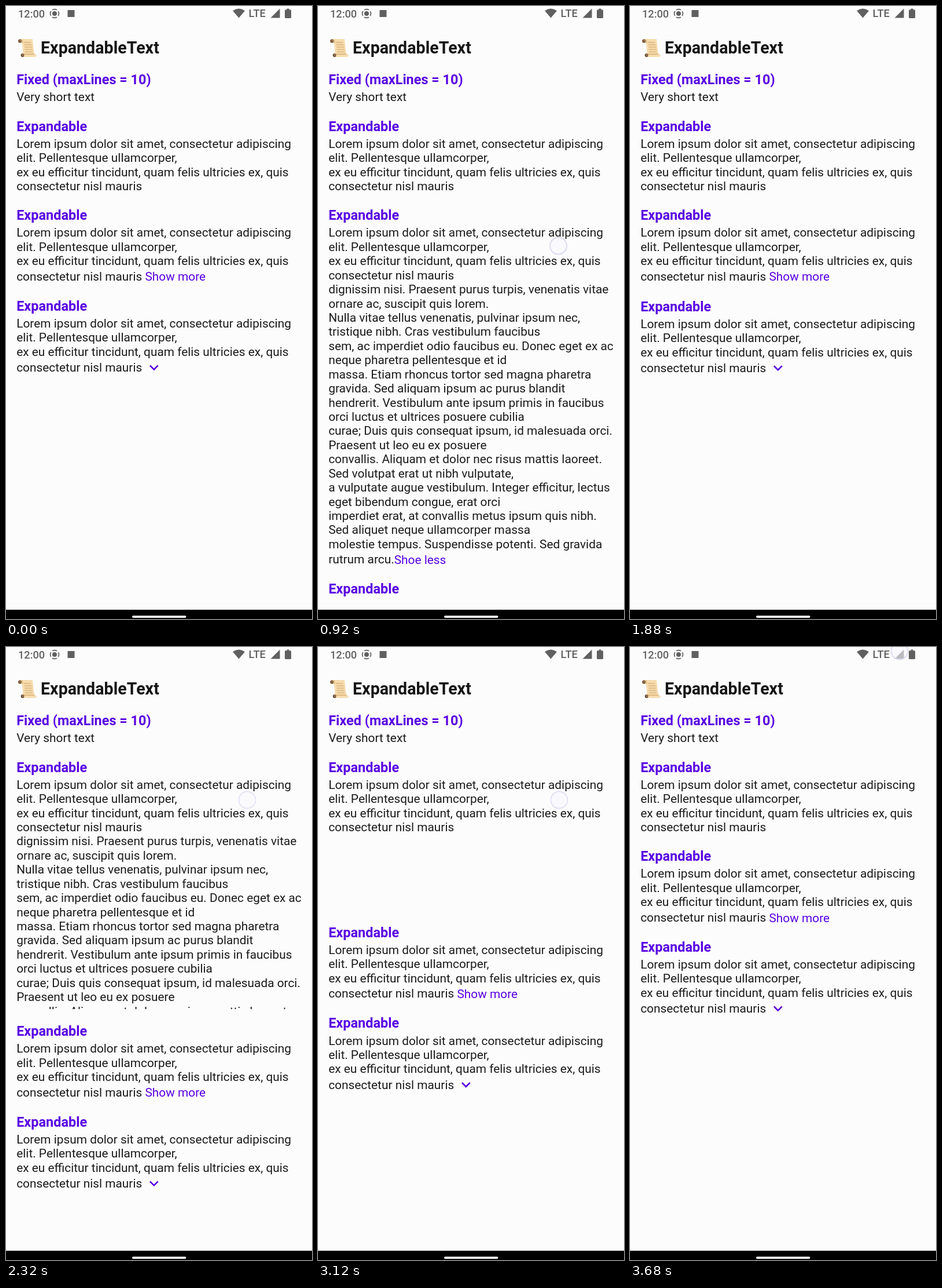
Animation, 529 px wide and 1058 px high, one loop 3.72 s. Source, as an HTML page:

```html
<!DOCTYPE html>
<html lang="en">
<head>
<meta charset="utf-8">
<title>ExpandableText</title>
<style>
  html, body { margin: 0; width: 100%; height: 100%; overflow: hidden; background: #fcfcfc; }
  svg { display: block; width: 529px; height: 1058px; }
  text { font: 20.85px Roboto, sans-serif; fill: #1b1b1b; white-space: pre; }
  .head { font-size: 23.45px; font-weight: 700; }
  .head, .link { fill: #5800e2; }
  .title { font-size: 28.6px; font-weight: 700; fill: #151515; }
  .status { fill: #606060; }
  .status text { font-size: 18.2px; font-weight: 500; fill: #606060; }
</style>
</head>
<body>
<svg viewBox="0 0 529 1058">
  <defs>
    <clipPath id="page"><rect width="529" height="1022"/></clipPath>
    <clipPath id="clip2"><rect id="room2" width="529"/></clipPath>
    <clipPath id="clip3"><rect id="room3" width="529"/></clipPath>
  </defs>
  <rect width="529" height="1058" fill="#fcfcfc"/>

  <g class="status">
    <text x="21" y="19.7">12:00</text>
    <circle cx="84" cy="13" r="4"/>
    <circle cx="84" cy="13" r="7.4" fill="none" stroke="#606060" stroke-width="1.7"
      stroke-dasharray="8.4 3.22" stroke-dashoffset="4.2"/>
    <rect x="106.5" y="7" width="12" height="12"/>
    <path d="M402.5 20.5L392 8.2Q402.5 .8 413 8.2Z"/>
    <text x="419.5" y="19.3">LTE</text>
    <path d="M457.5 20.5L473.5 4.5V20.5Z"/>
    <path d="M485.5 4.5h4v1.8h2q1.5 0 1.5 1.5v11.7q0 1.5 -1.5 1.5h-8q-1.5 0 -1.5-1.5V7.8q0-1.5 1.5-1.5h2Z"/>
  </g>

  <!-- scroll -->
  <path d="M25 57H46Q47 70 49 83Q53 83 53 86Q52 88 49 88H30Q29 75 28 64Q22 65 21 61Q21 57 25 57Z" fill="#f6dcae"/>
  <path d="M31 63h12M31.500 67h13M32 71h13M32.500 75h13M33 79h13" stroke="#d9b57c" stroke-width="1.3"/>
  <path d="M26 57.500Q30 59 28 64M30 83H49" fill="none" stroke="#d8ad70" stroke-width="1.3"/>
  <circle cx="24" cy="60.500" r="2.900" fill="#6b4a35"/>
  <circle cx="24.500" cy="60" r="1.100" fill="#d8ad70"/>
  <circle cx="28.500" cy="85" r="2.900" fill="#6b4a35"/>
  <circle cx="29" cy="84.500" r="1.100" fill="#d8ad70"/>
  <text class="title" x="60" y="82">ExpandableText</text>

  <g clip-path="url(#page)">
    <g id="sec1"></g>
    <g id="sec2"><g id="short2"></g><g id="long2" clip-path="url(#clip2)"></g></g>
    <g id="sec3"><g id="short3"></g><g id="long3" clip-path="url(#clip3)"></g></g>
    <g id="sec4">
      <path fill="#5800e2" transform="translate(240.200 608.300) scale(1.303)"
        d="M7.410 8.590L12 13.170l4.590-4.580L18 10l-6 6-6-6Z"/>
    </g>
  </g>

  <circle id="cursor" r="14.500" fill="#f6f6ff" fill-opacity=".6" stroke="#d9d9f1" stroke-width="1.800"/>
  <rect y="1042" width="529" height="16"/>
  <rect x="218" y="1052.300" width="93.500" height="3.600" rx="1.800" fill="#fff"/>
</svg>
<script>
const LOOP = 3720, STEP = 40, LEFT = 18.2, LINE = 24.43, GROW = 20 * LINE, RATE = 0.0185;
const $ = id => document.getElementById(id);

const lorem = `Lorem ipsum dolor sit amet, consectetur adipiscing
elit. Pellentesque ullamcorper,
ex eu efficitur tincidunt, quam felis ultricies ex, quis
consectetur nisl mauris
dignissim nisi. Praesent purus turpis, venenatis vitae
ornare ac, suscipit quis lorem.
Nulla vitae tellus venenatis, pulvinar ipsum nec,
tristique nibh. Cras vestibulum faucibus
sem, ac imperdiet odio faucibus eu. Donec eget ex ac
neque pharetra pellentesque et id
massa. Etiam rhoncus tortor sed magna pharetra
gravida. Sed aliquam ipsum ac purus blandit
hendrerit. Vestibulum ante ipsum primis in faucibus
orci luctus et ultrices posuere cubilia
curae; Duis quis consequat ipsum, id malesuada orci.
Praesent ut leo eu ex posuere
convallis. Aliquam et dolor nec risus mattis laoreet.
Sed volutpat erat ut nibh vulputate,
a vulputate augue vestibulum. Integer efficitur, lectus
eget bibendum congue, erat orci
imperdiet erat, at convallis metus ipsum quis nibh.
Sed aliquet neque ullamcorper massa
molestie tempus. Suspendisse potenti. Sed gravida
rutrum arcu.`.split("\n");

function addText(parent, y, str, cls = "") {
  const el = document.createElementNS("http://www.w3.org/2000/svg", "text");
  el.setAttribute("x", LEFT);
  el.setAttribute("y", y);
  el.setAttribute("class", cls);
  el.textContent = str;
  $(parent).append(el);
  return el;
}

// The last line sits lower by `drop` when it holds a link or an icon.
function addBody(parent, y, count, drop = 0, link = "") {
  lorem.slice(0, count).forEach((str, i) => {
    const last = i === count - 1;
    const el = addText(parent, y + i * LINE + (last ? drop : 0), str);
    if (last && link) {
      const span = document.createElementNS("http://www.w3.org/2000/svg", "tspan");
      span.setAttribute("class", "link");
      span.setAttribute("dy", 0.8);
      span.textContent = link;
      el.append(span);
    }
  });
}

addText("sec1", 135.3, "Fixed (maxLines = 10)", "head");
addText("sec1", 164.3, "Very short text");
addText("sec2", 215.5, "Expandable", "head");
addBody("short2", 244.7, 4);
addBody("long2", 244.7, 24);
addText("sec3", 369.2, "Expandable", "head");
addBody("short3", 398.4, 4, 2, " Show more");
addBody("long3", 398.4, 24, 2, "Shoe less");
addText("sec4", 525.8, "Expandable", "head");
addBody("sec4", 555, 4, 3.1);

// Critically damped spring from 1 to 0.
function spring(ms) {
  const u = Math.max(0, ms) * RATE;
  return (1 + u) * Math.exp(-u);
}

function setSection(n, t, open, close, top, bottom) {
  const isOpen = t >= open && t < close;
  const extra = GROW * (t < close ? 1 - spring(t - open) : spring(t - close));
  $("short" + n).style.display = isOpen ? "none" : "";
  $("long" + n).style.display = isOpen ? "" : "none";
  $("room" + n).setAttribute("y", top);
  $("room" + n).setAttribute("height", bottom - top + extra);
  return extra;
}

// time, x, y, opacity
const path = [
  [0, 550, 475, 0], [120, 545, 470, 1], [340, 416, 430, 1], [920, 415.5, 414, 1],
  [1360, 414.5, 432, 1], [1520, 414.5, 432, 0.6], [1680, 414.5, 432, 0],
  [2080, 417, 290, 0], [2160, 417, 264, 1], [2300, 417, 264, 0.8], [2440, 417, 264, 0],
  [2840, 417, 264, 0], [2920, 417, 264, 1], [3120, 417, 264, 0.8],
  [3360, 417, 264, 0.7], [3680, 466, 7, 1], [3720, 466, 7, 1]
];

function moveCursor(t) {
  const i = path.findIndex(p => p[0] > t);
  const a = path[i - 1], b = path[i], k = (t - a[0]) / (b[0] - a[0]);
  const [, x, y, alpha] = a.map((v, j) => v + (b[j] - v) * k);
  $("cursor").setAttribute("transform", `translate(${x} ${y})`);
  $("cursor").setAttribute("opacity", alpha);
}

const start = performance.now();
function draw() {
  const t = Math.floor((performance.now() - start) % LOOP / STEP) * STEP;
  const d2 = setSection(2, t, 2207, 2980, 222, 323.1);
  const d3 = setSection(3, t, 380, 1413, 376, 481);
  $("sec3").setAttribute("transform", `translate(0 ${d2})`);
  $("sec4").setAttribute("transform", `translate(0 ${d2 + d3})`);
  moveCursor(t);
  requestAnimationFrame(draw);
}
draw();
</script>
</body>
</html>
```
